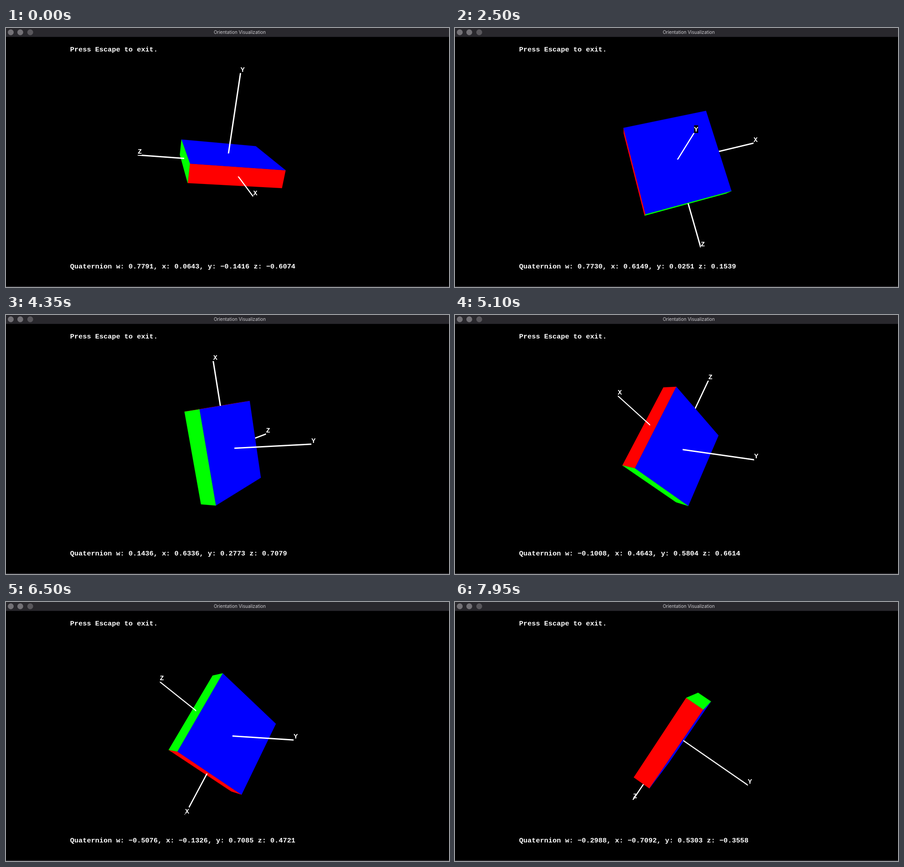
Write an HTML page with a canvas that moves like this. It is 978 by 573 pixels and loops after 8 s.

```html
<!DOCTYPE html>
<html lang="en">
<head>
<meta charset="utf-8">
<title>Orientation Visualization</title>
<style>
  html, body { margin: 0; width: 100%; height: 100%; overflow: hidden; background: #000; }
  body { position: relative; }
  canvas { position: absolute; left: 0; top: 0; }
  .bar {
    position: absolute; left: 0; top: 0; width: 978px; height: 19px;
    background: #29282d; border-bottom: 1px solid #1d1c20;
  }
  .bar i {
    position: absolute; top: 3px; width: 13px; height: 13px;
    border-radius: 50%; background: #737176;
  }
  .bar span {
    position: absolute; left: 416px; width: 200px; top: 0; text-align: center;
    font: 10px/18px Inter, "Liberation Sans", sans-serif; color: #cdccd0;
  }
  .line {
    position: absolute; left: 141.6px; white-space: pre; color: #fff;
    font: bold 15.35px/18px "Liberation Mono", monospace;
  }
  .edge { position: absolute; left: 0; top: 571px; width: 978px; height: 2px; background: #242327; }
</style>
</head>
<body>
<canvas id="view" width="978" height="573"></canvas>
<div class="bar">
  <i style="left:4px"></i><i style="left:25px"></i><i style="left:47px;background:#59575c"></i>
  <span>Orientation Visualization</span>
</div>
<div class="line" style="top:39px">Press Escape to exit.</div>
<div class="line" style="top:519px" id="readout"></div>
<div class="edge"></div>
<script>
const LOOP = 8000, STEP = 50;
const CX = 488.4, CY = 295.7, DIST = 7;
const FOCAL = 275.5 / Math.tan(Math.PI / 8);   // 45 degree field of view
const HALF = [1, 0.2, 1];
const AXIS_LEN = 2;
const COLORS = ['#f00', '#00f', '#0f0'];
const NAMES = 'XYZ';
const AXES = [0, 1, 2];
const UP = [0, 1, 0], VIEWER = [0, 0, 1];

// The sensor's z axis points up on screen, its y axis towards the viewer
const swapYZ = ([w, x, y, z]) => [w, x, z, y];

function unit(q) {
  const n = Math.hypot(...q);
  return q.map(v => v / n);
}

const mix = (a, b, u) => unit(a.map((v, i) => v + (b[i] - v) * u));

function mul([w, x, y, z], [v, a, b, c]) {
  return [
    w * v - x * a - y * b - z * c,
    w * a + x * v + y * c - z * b,
    w * b - x * c + y * v + z * a,
    w * c + x * b - y * a + z * v
  ];
}

function turn(q, deg, axis) {
  const half = deg * Math.PI / 360;
  return mul([Math.cos(half), ...axis.map(v => v * Math.sin(half))], q);
}

// Poses the box is held in by hand, as w, x, y, z
const [yawed, level, facing, upright, edge, tipped, rolled] = [
  [0.7791, 0.0643, -0.1416, -0.6074],
  [0.9596, 0.1427, -0.0724, -0.2315],
  [0.5709, 0.7539, 0.0685, 0.3177],
  [0.1436, 0.6336, 0.2773, 0.7079],
  [-0.2736, 0.1573, 0.7956, 0.5170],
  [-0.6527, -0.4188, 0.5704, 0.2708],
  [-0.2988, -0.7092, 0.5303, -0.3558]
].map(swapYZ);

// When each pose is reached; the hand swings a little wide between some
const track = [
  { at: 1050, q: yawed, rest: true },
  { at: 1850, q: level, rest: true },
  { at: 2750, q: mix(level, facing, 0.9) },
  { at: 3300, q: facing },
  { at: 4150, q: turn(upright, 7, UP) },
  { at: 4350, q: upright },
  { at: 5325, q: turn(mix(upright, edge, 0.67), 6, UP) },
  { at: 5800, q: edge },
  { at: 7200, q: tipped },
  { at: 7715, q: turn(mix(tipped, rolled, 0.65), 12, VIEWER) },
  { at: 7950, q: rolled }
];

function slope(i, c) {
  const [a, b, d] = [track[i - 1], track[i], track[i + 1]];
  if (b.rest) return 0;
  const h0 = b.at - a.at, s0 = (b.q[c] - a.q[c]) / h0;
  if (!d) return s0;
  const h1 = d.at - b.at, s1 = (d.q[c] - b.q[c]) / h1;
  return (s0 * h1 + s1 * h0) / (h0 + h1);
}

// Hermite curve along the track
function orientation(t) {
  let i = 0;
  while (i < track.length - 2 && t > track[i + 1].at) i++;
  const a = track[i], b = track[i + 1], h = b.at - a.at;
  const u = Math.min(1, Math.max(0, (t - a.at) / h)), v = 1 - u;
  return unit(a.q.map((from, c) =>
    from + (b.q[c] - from) * u * u * (3 - 2 * u) +
    h * u * v * (slope(i, c) * v - slope(i + 1, c) * u)));
}

function basis(q) {
  const back = q.map((v, i) => i ? -v : v);
  return AXES.map(i => {
    const axis = [0, 0, 0, 0];
    axis[i + 1] = 1;
    return mul(mul(q, axis), back).slice(1);
  });
}

const scale = (v, s) => v.map(x => x * s);

function project(p) {
  const k = FOCAL / (DIST - p[2]);
  return [CX + p[0] * k, CY - p[1] * k];
}

const ctx = document.getElementById('view').getContext('2d');
const readout = document.getElementById('readout');

function fillPath(points) {
  ctx.beginPath();
  points.forEach(p => ctx.lineTo(p[0], p[1]));
  ctx.closePath();
  ctx.fill();
}

// Wide lines have ends cut along the pixel axes
function drawLine(p, q) {
  const flat = Math.abs(q[0] - p[0]) > Math.abs(q[1] - p[1]);
  const ox = flat ? 0 : 1.5, oy = flat ? 1.5 : 0;
  ctx.fillStyle = '#fff';
  fillPath([[p[0] - ox, p[1] - oy], [q[0] - ox, q[1] - oy],
            [q[0] + ox, q[1] + oy], [p[0] + ox, p[1] + oy]]);
}

function drawLabel(name, [x, y]) {
  ctx.fillStyle = '#000';
  ctx.fillRect(x, y - 17, 9.2, 17);
  ctx.fillStyle = '#fff';
  ctx.fillText(name, x, y - 3);
}

function drawAxis(m, i, from) {
  const start = project(scale(m[i], from));
  const tip = project(scale(m[i], AXIS_LEN));
  const near = m[i][2] > 0;
  if (!near) drawLabel(NAMES[i], tip);
  drawLine(start, tip);
  if (near) drawLabel(NAMES[i], tip);
}

function drawFace(m, i, side) {
  const j = (i + 1) % 3, k = (i + 2) % 3;
  const corners = [[1, 1], [1, -1], [-1, -1], [-1, 1]].map(([u, v]) =>
    project(AXES.map(c =>
      side * HALF[i] * m[i][c] + u * HALF[j] * m[j][c] + v * HALF[k] * m[k][c])));
  ctx.fillStyle = COLORS[i];
  fillPath(corners);
  ctx.strokeStyle = COLORS[i];
  ctx.stroke();
}

function draw(t) {
  const q = orientation(t), m = basis(q);
  const seen = (i, side) => side * m[i][2] * DIST > HALF[i];
  const order = [...AXES].sort((i, j) => m[i][2] - m[j][2]);

  ctx.clearRect(0, 0, 978, 573);
  ctx.font = 'bold 15.35px "Liberation Mono", monospace';
  ctx.lineWidth = 0.3;
  ctx.lineJoin = 'round';

  for (const i of order) if (!seen(i, 1)) drawAxis(m, i, 0);
  for (const i of AXES)
    for (const side of [1, -1])
      if (seen(i, side)) drawFace(m, i, side);
  for (const i of order) if (seen(i, 1)) drawAxis(m, i, HALF[i]);

  const [w, x, y, z] = swapYZ(q).map(v => v.toFixed(4).replace('-', '\u2212'));
  readout.textContent = `Quaternion w: ${w}, x: ${x}, y: ${y} z: ${z}`;
}

const begin = performance.now();
function tick() {
  const t = (performance.now() - begin) % LOOP;
  draw(Math.floor(t / STEP) * STEP);
  requestAnimationFrame(tick);
}
tick();
</script>
</body>
</html>
```
